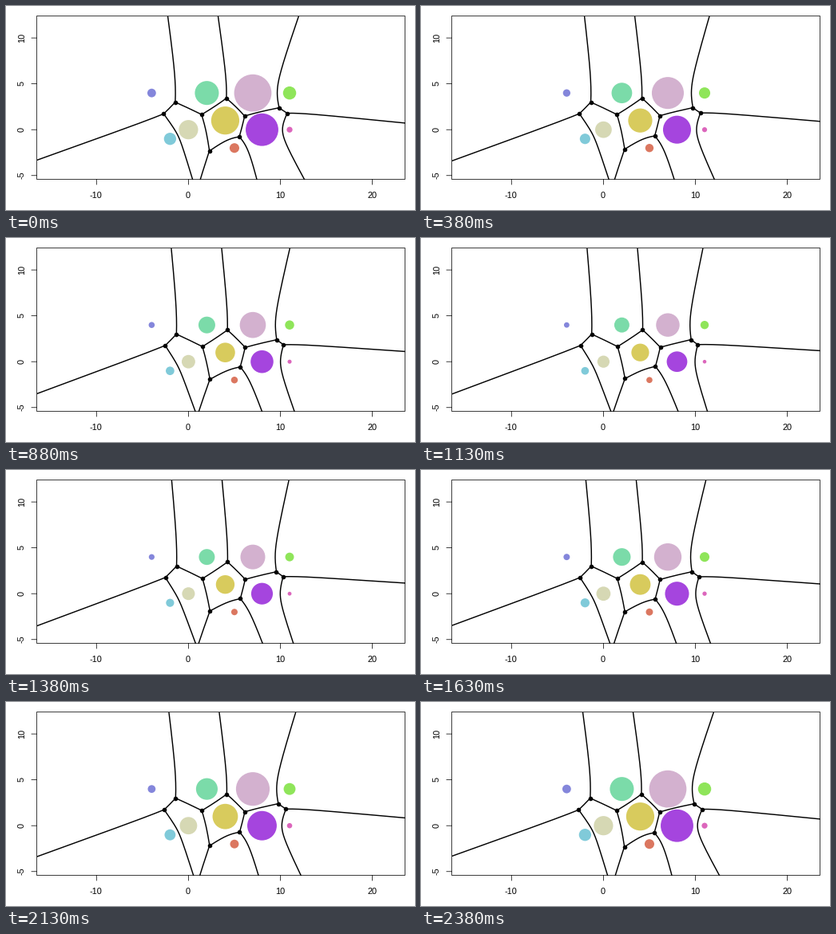
A matplotlib script for the animation above (2500 ms loop, 512 by 256 pixels).

```python
import numpy as np
import matplotlib.pyplot as plt
from matplotlib.animation import FuncAnimation
from matplotlib.patches import Circle, Rectangle

W, H, DPI = 512, 256, 64
PX = 72 / DPI                      # one pixel in points
SCALE, X0, Y0 = 11.51, 228.4, 155.2
LEFT, TOP, RIGHT, BOTTOM = 38.5, 12.5, 499.5, 217.5
STEPS, SHRINK, FAR = 10, 0.95, 200

# x, y, radius, colour
SITES = [
    (-4, 4, 0.47, "#8486DB"),
    (2, 4, 1.305, "#7BDBA9"),
    (7, 4, 2.03, "#D3B1CF"),
    (11, 4, 0.715, "#8FE55A"),
    (0, 0, 1.05, "#D6D8B4"),
    (4, 1, 1.53, "#D8CB5D"),
    (8, 0, 1.775, "#A545DE"),
    (11, 0, 0.315, "#DC66BC"),
    (-2, -1, 0.665, "#80CAD9"),
    (5, -2, 0.525, "#DB7760"),
]
CENTERS = np.array([s[:2] for s in SITES], float)
RADII = np.array([s[2] for s in SITES])
ANGLES = np.linspace(0, 2 * np.pi, 4001)
RAYS = np.column_stack([np.cos(ANGLES), np.sin(ANGLES)])


def to_px(p):
    return np.array([X0, Y0]) + np.asarray(p) * [SCALE, -SCALE]


def voronoi(weights):
    """Edges and vertices of the additively weighted Voronoi diagram."""
    edges, vertices = [], []
    for i, c in enumerate(CENTERS):
        others = np.delete(np.arange(len(CENTERS)), i)
        d = CENTERS[others] - c
        dw = weights[others] - weights[i]
        denom = RAYS @ d.T + dw
        reach = np.where(denom > 1e-9,
                         ((d ** 2).sum(1) - dw ** 2) / (2 * np.maximum(denom, 1e-9)),
                         np.inf)
        near = reach.min(1)
        owner = others[reach.argmin(1)]
        bounded = near < FAR
        points = c + RAYS * np.where(bounded, near, np.nan)[:, None]

        # every edge belongs to the lower numbered of its two sites
        edges += [np.where((owner > i)[:, None], points, np.nan), [[np.nan] * 2]]
        turn = ((owner[1:] != owner[:-1]) & bounded[1:] & bounded[:-1]
                & (owner[1:] > i) & (owner[:-1] > i))
        vertices.append((points[1:][turn] + points[:-1][turn]) / 2)
    return to_px(np.vstack(edges)), to_px(np.vstack(vertices))


fig = plt.figure(figsize=(W / DPI, H / DPI), dpi=DPI, facecolor="white")
ax = fig.add_axes([0, 0, 1, 1])
ax.set(xlim=(0, W), ylim=(H, 0))
ax.axis("off")

thin = dict(lw=0.75 * PX, snap=False)
box = Rectangle((LEFT, TOP), RIGHT - LEFT, BOTTOM - TOP,
                fill=False, ec="black", zorder=4, **thin)
ax.add_patch(box)

font = dict(family="Liberation Sans", size=11 * PX, ha="center",
            va="baseline", rotation_mode="anchor")
for v in (-10, 0, 10, 20):
    x = X0 + v * SCALE
    ax.plot([x, x], [BOTTOM, BOTTOM + 6.5], color="black", **thin)
    ax.text(x - 0.4, 241, str(v), **font)
for v in (-5, 0, 5, 10):
    y = Y0 - v * SCALE
    ax.plot([LEFT - 6.5, LEFT], [y, y], color="black", **thin)
    ax.text(23, y - 0.4, str(v), rotation=90, **font)

discs = [ax.add_patch(Circle(to_px(s[:2]), 1, fc=s[3], lw=0)) for s in SITES]
edge_line, = ax.plot([], [], color="black", lw=1.45 * PX, zorder=3,
                     solid_capstyle="butt")
dots, = ax.plot([], [], "o", color="black", ms=5.6 * PX, mew=0, zorder=5,
                snap=False)
for art in (edge_line, dots):
    art.set_clip_path(box)


def draw(frame):
    # shrink, hold, then grow back
    step = min(frame, 2 * STEPS - 1 - frame)
    weights = RADII * SHRINK ** step
    for disc, r in zip(discs, weights):
        disc.set_radius(r * SCALE)
    edges, vertices = voronoi(weights)
    edge_line.set_data(*edges.T)
    dots.set_data(*vertices.T)
    return [*discs, edge_line, dots]


anim = FuncAnimation(fig, draw, frames=2 * STEPS, interval=125,
                     repeat=True, repeat_delay=0)
plt.show()
```
